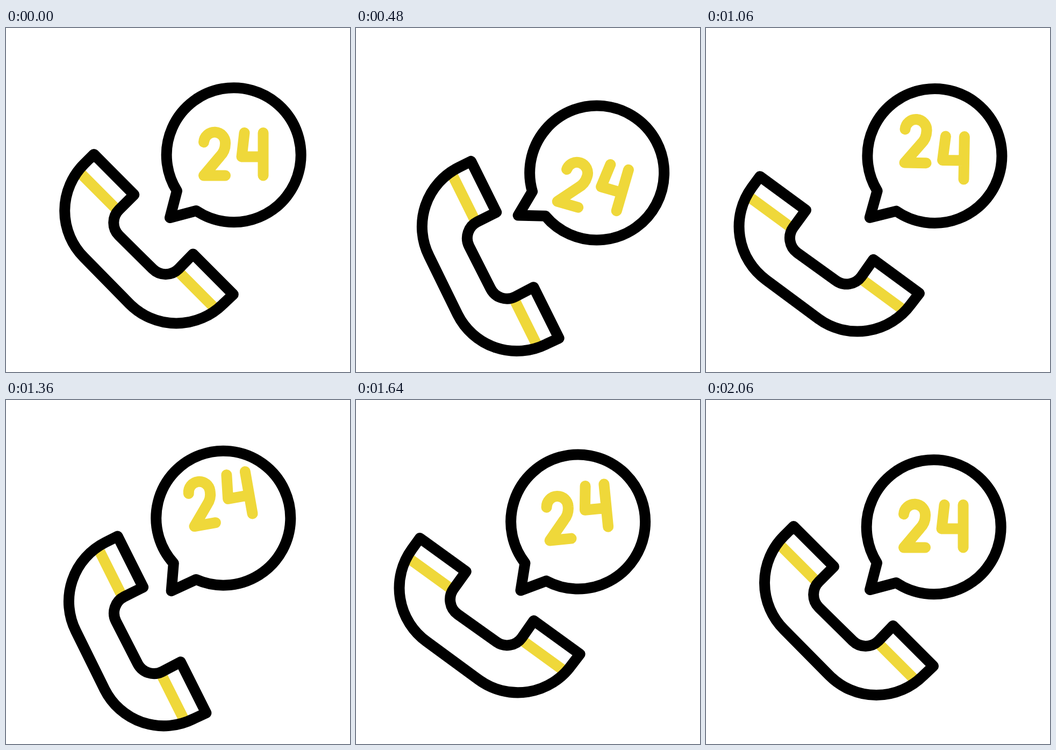
An HTML page for the animation above (2200 ms loop, 640x640 px).

```html
<!DOCTYPE html>
<html lang="en">
<head>
<meta charset="utf-8">
<title>24 hour call</title>
<style>
  html, body { margin: 0; width: 100%; height: 100%; overflow: hidden; background: #fff; }
  svg { display: block; width: 100%; height: 100%; }
  path { fill: none; stroke-width: 20; stroke-linejoin: round; }
  .line { stroke: #000; }
  .accent { stroke: #efd83a; }
  .digit { stroke-linecap: round; }
</style>
</head>
<body>
<svg viewBox="0 0 640 640">
  <g id="phone">
    <path class="accent" d="M134.500 266.500L207.500 339.500M318.500 450.500L391.500 523.500"/>
    <path class="line" d="M163 235L238 310L210 338A34 34 0 0 0 210 386L273 448A34 34 0 0 0 321 448L348 420L423 495L404 513A123 123 0 0 1 230 513L145 427A123 123 0 0 1 145 253Z"/>
  </g>
  <g id="bubble">
    <path class="line" d="M318 303L305 353L354 340A125 125 0 1 0 318 303Z"/>
    <path id="two" class="accent digit" d="M368 212.500A20 20 0 0 1 408 215Q408 229 398 239L368 274.500H408"/>
    <path id="four" class="accent digit" d="M443.500 195L438.500 239.500H478.500M478.500 195V274.500"/>
  </g>
</svg>
<script>
  const LOOP = 2200;
  const END = 2060;
  const MID = 1005;
  const RING_PERIOD = 451;
  const FOUR_DELAY = 170;

  const smooth = x => x * x * (3 - 2 * x);

  // Swings from rest to `up`, across to `down`, and back, in three equal eased steps.
  function swing(t, step, up, down) {
    const stops = [0, up, down, 0];
    const x = Math.min(Math.max(t / step, 0), 2.9999);
    const i = Math.floor(x);
    return stops[i] + (stops[i + 1] - stops[i]) * smooth(x - i);
  }

  // The ringing is strongest far from the middle and fades at both ends.
  function ring(t) {
    const fade = Math.max(0, Math.min(1, t / 250, (END - t) / 420));
    const strength = 8 + 0.037 * Math.abs(t - MID);
    return fade * strength * Math.sin(2 * Math.PI * (t - 760) / RING_PERIOD);
  }

  const slide = t => 34 * Math.max(0, 1 - Math.abs(t - MID) / MID);
  const tilt = t => swing(t, 667, 20, -10);
  const bounce = t => swing(t, 610, 37.5, -37.5);

  const move = (id, transform) =>
    document.getElementById(id).setAttribute("transform", transform);

  function draw(t) {
    const s = slide(t);
    move("phone", `translate(${-s} ${s}) rotate(${ring(t)} 207 439)`);
    move("bubble", `rotate(${tilt(t)} 319 339)`);
    move("two", `translate(0 ${bounce(t)})`);
    move("four", `translate(0 ${bounce(t - FOUR_DELAY)})`);
  }

  function tick() {
    draw(performance.now() % LOOP);
    requestAnimationFrame(tick);
  }
  tick();
</script>
</body>
</html>
```
